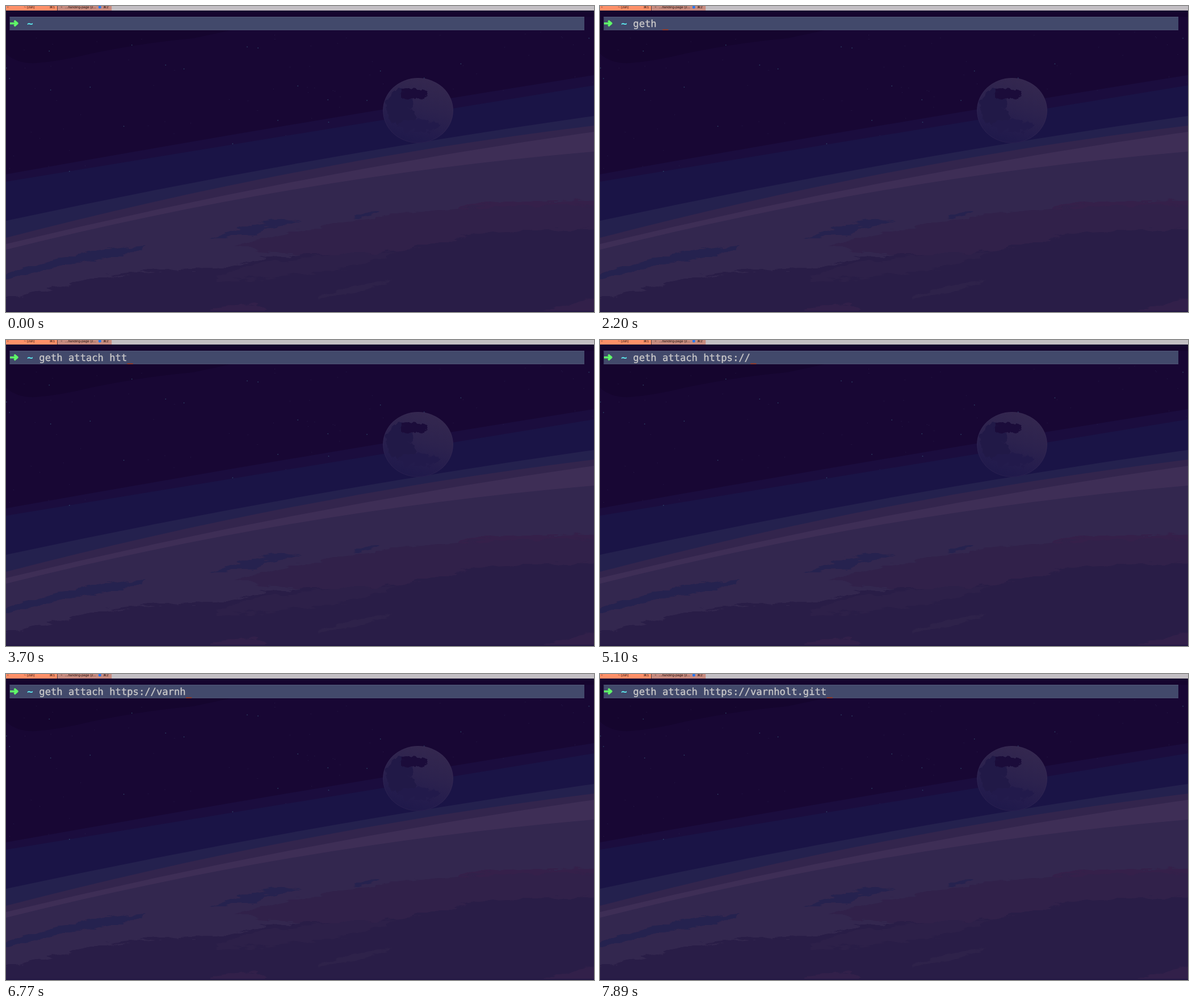
An HTML page for the animation above (8 s loop, 1036 by 540 pixels).

```html
<!DOCTYPE html>
<html lang="en">
<head>
<meta charset="utf-8">
<title>Terminal typing</title>
<style>
  html, body { margin: 0; width: 100%; height: 100%; overflow: hidden; background: #180734; }
  svg { display: block; width: 1036px; height: 540px; }
  text { white-space: pre; text-rendering: geometricPrecision; }
  .mono { font: 17.176px "DejaVu Sans Mono", monospace; stroke-width: .35px; }
  .tab { font: 6.2px "Liberation Sans", "DejaVu Sans", sans-serif; fill: #2a1712; }
</style>
</head>
<body>
<svg viewBox="0 0 1036 540" xmlns="http://www.w3.org/2000/svg">
  <defs>
    <filter id="ragged" x="-5%" y="-15%" width="110%" height="130%" color-interpolation-filters="sRGB">
      <feTurbulence type="fractalNoise" baseFrequency=".025 .11" numOctaves="3" seed="4"/>
      <feDisplacementMap in="SourceGraphic" scale="18" xChannelSelector="R" yChannelSelector="G"/>
    </filter>
    <filter id="crater" x="-10%" y="-10%" width="120%" height="120%" color-interpolation-filters="sRGB">
      <feTurbulence type="fractalNoise" baseFrequency=".09" numOctaves="3" seed="9"/>
      <feDisplacementMap in="SourceGraphic" scale="16" xChannelSelector="R" yChannelSelector="G"/>
    </filter>
    <linearGradient id="moonTone" x1=".7" y1="0" x2=".35" y2="1">
      <stop offset="0" stop-color="#35284f"/>
      <stop offset=".45" stop-color="#2c224e"/>
      <stop offset=".75" stop-color="#241c4d"/>
      <stop offset="1" stop-color="#1e184a"/>
    </linearGradient>
    <clipPath id="disc"><ellipse cx="726" cy="184.5" rx="62" ry="57.5"/></clipPath>
  </defs>

  <path d="M0 8V84Q18 101 48 101Q95 98 150 84Q240 65 330 57L400 42V19H1036V8Z" fill="#15052e"/>
  <g id="bands"></g>
  <g id="stars"></g>

  <!-- clouds -->
  <g filter="url(#ragged)">
    <path d="M-30 524Q70 500 130 486Q220 464 370 462Q520 430 640 432Q720 425 800 403Q900 390 1070 388V570H-30Z" fill="#291d47"/>
    <path d="M400 425Q520 390 640 376Q760 352 1070 346V394Q900 392 800 408Q700 440 530 440Z" fill="#31214a"/>
    <path d="M370 478Q460 440 690 434Q620 462 540 470Q460 484 370 484Z" fill="#2d2049"/>
    <path d="M545 514Q600 492 684 484Q640 502 560 516Z" fill="#2e224a"/>
    <path d="M360 535L440 524L470 545H360ZM925 548Q980 524 1070 512V560H925Z" fill="#32204a"/>
    <path d="M-20 484Q10 467 60 454Q140 434 240 422L242 430Q160 446 90 462Q40 474 -20 487Z" fill="#25224f"/>
    <path d="M360 413Q390 392 440 384Q480 377 522 379Q500 389 455 393L440 404Q400 402 360 413ZM610 373Q630 363 656 364Q645 372 610 374Z" fill="#26224f"/>
    <path d="M800 352Q900 342 1060 344V352Q900 350 800 357Z" fill="#35204a"/>
  </g>
  <rect y="538" width="1036" height="2" fill="#211642"/>

  <!-- moon -->
  <g clip-path="url(#disc)">
    <rect x="660" y="124" width="132" height="122" fill="url(#moonTone)"/>
    <g filter="url(#crater)">
      <path d="M670 170Q678 146 704 148L718 168L712 184L726 196L710 212L676 206Z" fill="#211947"/>
      <path d="M696 150Q720 142 742 152L736 164L700 161Z" fill="#1b0c3a"/>
      <path d="M688 206L726 200L766 208L750 222L704 222Z" fill="#221a4b"/>
    </g>
    <ellipse cx="726" cy="184.5" rx="61.5" ry="57" fill="none" stroke="#40305a" stroke-opacity=".3"/>
  </g>

  <!-- tab strip -->
  <rect width="1036" height="8" fill="#c3bfc4"/>
  <rect width="90" height="8" fill="#ff9068"/>
  <rect x="90" width="1.2" height="8" fill="#593d3c"/>
  <rect x="91.2" width="95" height="8" fill="#c88c80"/>
  <g class="tab">
    <text x="1.5" y="4" fill-opacity=".55">×</text>
    <text x="31.5" y="4">~ (zsh)</text>
    <text x="76.5" y="4">⌘1</text>
    <text x="96" y="4" fill-opacity=".55">×</text>
    <text x="104" y="4">.../landing-page (z...</text>
    <text x="171" y="4">⌘2</text>
  </g>
  <circle cx="165.3" cy="2" r="2.5" fill="#2878f0"/>

  <!-- prompt line -->
  <rect x="6.5" y="19" width="1012.5" height="23.5" fill="#42496b"/>
  <path d="M6.5 19.5H1019M6.5 42H1019" stroke="#525979"/>
  <path d="M7 30.7H19M14.5 26L20 30.7L14.5 35.4" fill="none" stroke="#5ffa68" stroke-width="3.6" stroke-linejoin="round"/>
  <text class="mono" x="37.3" y="37" fill="#60fdff" stroke="#60fdff" font-weight="bold">~</text>
  <text class="mono" id="command" x="58.33" y="37" fill="#c9c8c9" stroke="#c9c8c9"></text>
  <rect id="cursor" y="41" width="10.34" height="1.6" fill="#a0391f"/>
</svg>
<script>
const LOOP = 8000, LEFT = 58.33, CELL = 10.34, KEY_GAP = 80;

// Each burst of typing: start time, then its letters at an even pace.
const BURSTS = [
  [1470, 'g'], [1730, 'e'], [1910, 'th'], [2200, ' a'], [2560, 'tt'],
  [2920, 'a'], [3090, 'c'], [3270, 'h '], [3530, 'htt'], [4360, 'ps'],
  [4720, ':'], [4890, '/'], [5100, '/'], [6030, 'va'], [6290, 'r'],
  [6560, 'n'], [6770, 'hol'], [7120, 't.'], [7590, 'g'], [7770, 'i'], [7805, 'tt']
];
// Curved layers: height at the left edge, middle and right edge.
const BANDS = [
  [297, 207, 122, '#1b0d3e'],
  [310, 225, 140, '#1a1446'],
  [379, 277, 194, '#24214e'],
  [409, 292, 211, '#33254d'],
  [420, 308, 222, '#3e2e56'],
  [430, 322, 257, '#33274f']
];
const $ = id => document.getElementById(id);

function add(layer, tag, attrs) {
  const node = document.createElementNS('http://www.w3.org/2000/svg', tag);
  for (const name in attrs) node.setAttribute(name, attrs[name]);
  $(layer).append(node);
}

for (const [left, mid, right, fill] of BANDS) {
  const bend = 2 * mid - (left + right) / 2;
  add('bands', 'path', { d: `M0 ${left}Q518 ${bend} 1036 ${right}V540H0Z`, fill });
}

let seed = 17;
const random = () => (seed = seed * 16807 % 2147483647) / 2147483647;
for (let i = 0; i < 90; i++) {
  const x = random() * 1036, y = 45 + random() * (270 - x * 0.16);
  const bright = i % 4 === 0, size = bright ? 1.4 : 1;
  add('stars', 'rect', {
    x, y, width: size, height: size,
    fill: bright ? '#36607c' : '#3b3a62', opacity: bright ? 0.8 : 0.5
  });
}

function typed(t) {
  return BURSTS.map(([start, text]) =>
    text.slice(0, Math.max(0, Math.floor((t - start) / KEY_GAP) + 1))).join('');
}

function draw(t) {
  const text = typed(t);
  const lit = t >= 1290 || (t >= 270 && t < 750);
  $('command').textContent = text;
  $('cursor').setAttribute('x', LEFT + text.length * CELL);
  $('cursor').setAttribute('visibility', lit ? 'visible' : 'hidden');
}

const start = performance.now();
function tick() {
  draw((performance.now() - start) % LOOP);
  requestAnimationFrame(tick);
}
draw(0);
requestAnimationFrame(tick);
</script>
</body>
</html>
```
